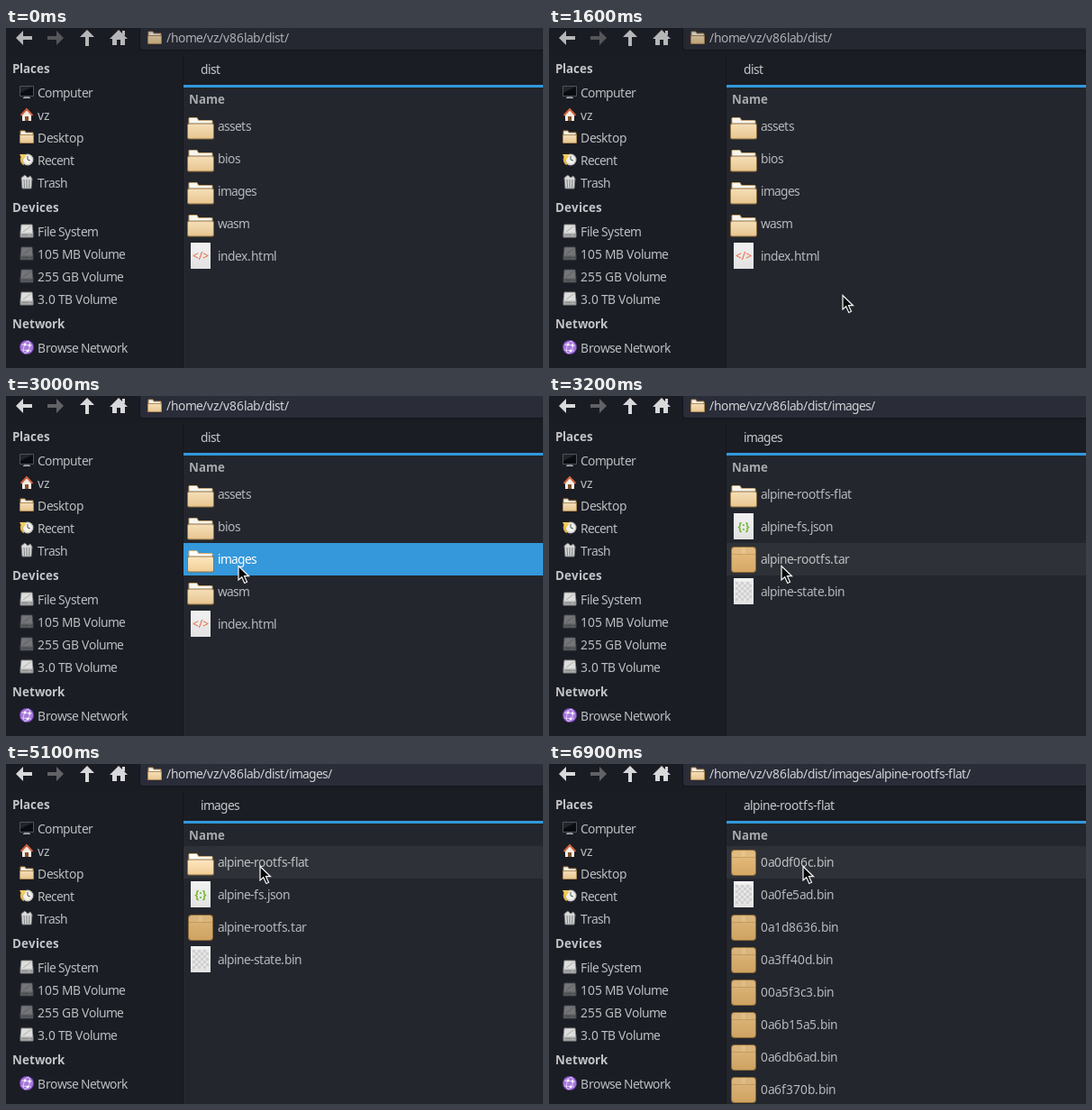
An HTML page with a canvas that plays this animation: 596 by 377 pixels, repeating every 8000 ms.

```html
<!DOCTYPE html>
<html lang="en">
<head>
<meta charset="utf-8">
<title>File manager</title>
<style>
html, body { margin: 0; width: 100%; height: 100%; overflow: hidden; background: #1a1d24; }
canvas { display: block; width: 596px; height: 377px; }
</style>
</head>
<body>
<canvas id="stage" width="596" height="377"></canvas>
<script>
const ctx = document.getElementById('stage').getContext('2d');
const LOOP = 8000, STEP = 100, ROW = 36, LIST_TOP = 91;
const SANS = '"Noto Sans", sans-serif';
const BLUE = '#3498db';

const HOME = '/home/vz/v86lab/dist/';
const views = {
  dist: {
    title: 'dist', path: HOME,
    items: [['folder', 'assets'], ['folder', 'bios'], ['folder', 'images'], ['folder', 'wasm'], ['html', 'index.html']]
  },
  images: {
    title: 'images', path: HOME + 'images/',
    items: [['folder', 'alpine-rootfs-flat'], ['json', 'alpine-fs.json'], ['pack', 'alpine-rootfs.tar'], ['bin', 'alpine-state.bin']]
  },
  flat: {
    title: 'alpine-rootfs-flat', path: HOME + 'images/alpine-rootfs-flat/',
    items: ['0a0df06c', '0a0fe5ad', '0a1d8636', '0a3ff40d', '00a5f3c3', '0a6b15a5', '0a6db6ad', '0a6f370b']
      .map((name, i) => [i === 1 ? 'bin' : 'pack', name + '.bin'])
  }
};

const sidebar = [
  ['Places', 45, [['computer', 'Computer'], ['house', 'vz'], ['smallFolder', 'Desktop'], ['recent', 'Recent'], ['trash', 'Trash']]],
  ['Devices', 199, [['drive', 'File System'], ['darkDrive', '105 MB Volume'], ['darkDrive', '255 GB Volume'], ['drive', '3.0 TB Volume']]],
  ['Network', 328, [['globe', 'Browse Network']]]
];

function rect(x, y, w, h, color) {
  ctx.fillStyle = color;
  ctx.fillRect(x, y, w, h);
}

function round(x, y, w, h, r, color) {
  ctx.beginPath();
  ctx.roundRect(x, y, w, h, r);
  ctx.fillStyle = color;
  ctx.fill();
}

function circle(x, y, r, color) {
  ctx.beginPath();
  ctx.arc(x, y, r, 0, Math.PI * 2);
  ctx.fillStyle = color;
  ctx.fill();
}

function poly(points, fill, stroke, width = 1) {
  ctx.beginPath();
  for (let i = 0; i < points.length; i += 2) ctx.lineTo(points[i], points[i + 1]);
  ctx.closePath();
  if (fill) { ctx.fillStyle = fill; ctx.fill(); }
  if (stroke) { ctx.strokeStyle = stroke; ctx.lineWidth = width; ctx.stroke(); }
}

function line(points, color, width = 1) {
  ctx.beginPath();
  for (let i = 0; i < points.length; i += 2) ctx.lineTo(points[i], points[i + 1]);
  ctx.strokeStyle = color;
  ctx.lineWidth = width;
  ctx.stroke();
}

function shade(y0, y1, top, bottom) {
  const g = ctx.createLinearGradient(0, y0, 0, y1);
  g.addColorStop(0, top);
  g.addColorStop(1, bottom);
  return g;
}

// Hinted desktop text: whole-pixel advances, regular glyphs grown to the pixel grid.
function text(str, x, midY, color, bold) {
  const metrics = bold ? `bold 13.333px ${SANS}` : `13.3px ${SANS}`;
  const face = bold ? metrics : `13.8px ${SANS}`;
  ctx.fillStyle = color;
  for (const ch of str) {
    ctx.font = face;
    ctx.fillText(ch, x, midY + 5);
    ctx.font = metrics;
    x += Math.round(ctx.measureText(ch).width);
  }
}

function page(mark, color, weight) {
  rect(-11, -15, 22, 29, shade(-15, 14, '#f2f2f2', '#e2e2e2'));
  if (!mark) return;
  ctx.font = `${weight} 12px ${SANS}`;
  ctx.fillStyle = color;
  ctx.textAlign = 'center';
  ctx.fillText(mark, 0, 4);
  ctx.textAlign = 'left';
}

function disk(top, front, edge) {
  poly([-6, -7, 6, -7, 7, 3, 7, 7, -7, 7, -7, 3], front, edge);
  poly([-5.5, -6.5, 5.5, -6.5, 6.5, 2.5, -6.5, 2.5], top);
  line([-4, 1, 4, -5], front);
  rect(-5, 4, 7, 1, edge);
  rect(4, 4, 2, 1, edge);
}

// Icons are drawn around the origin.
const icons = {
  folder() {
    poly([-13.5, -9, -12.5, -10, -4, -10, -2, -7, 12.5, -7, 13.5, -6, 13.5, 3, -13.5, 3], '#c9a56c');
    poly([-12.5, -9, -4.5, -9, -2.5, -6, 12.5, -6, 12.5, 2, -12.5, 2], '#f7f6f2');
    round(-15, -3.5, 30, 18, 2, '#8f7043');
    round(-14, -2.5, 28, 16, 1.5, shade(-3, 14, '#f5dfb9', '#e7c58f'));
  },
  html() { page('</>', '#ea6339', 'normal'); },
  json() { page('{:}', '#75b832', 'bold'); },
  bin() {
    page();
    for (let y = 0; y < 7; y++)
      for (let x = 0; x < 6; x++)
        rect(-9 + x * 3, -11 + y * 3, 3, 3, (x + y) % 2 ? '#e6e6e6' : '#d0d0d0');
  },
  pack() {
    round(-14, -14, 28, 29, 4, '#8d6938');
    round(-13, -13, 26, 27, 3, shade(-8, 13, '#dbb478', '#cfa362'));
    round(-12, -13, 24, 7, [3, 3, 0, 0], '#d9b47c');
    rect(-13, -6, 26, 1, '#c49a5d');
    rect(-2, -13, 4, 7, '#dfbd88');
  },
  smallFolder() {
    poly([-7, -7, -2, -7, -1, -5, 7, -5, 7, 2, -7, 2], '#f4f3ef', '#b18a50');
    round(-8, -3, 16, 10, 1, '#b08c55');
    round(-7, -2, 14, 8, 1, shade(-3, 7, '#f5dfb9', '#e8c68f'));
  },
  computer() {
    round(-8, -7, 16, 12, 1, '#50545a');
    rect(-7, -6, 14, 10, '#090c11');
    poly([-7, -6, 7, -6, -7, 1], '#20242b');
    rect(-3, 5, 6, 1, '#777a7e');
    rect(-4, 6, 8, 1, '#b5b7b8');
  },
  house() {
    poly([-5, -1, 0, -6, 5, -1, 5, 7, -5, 7], '#f0ece4');
    line([-6.5, 1, 0, -6, 6.5, 1], '#d0603c', 2);
    rect(-2, 2, 4, 5, '#81502f');
  },
  recent() {
    circle(1, 0, 6.5, '#c9c9c5');
    circle(1, 0, 5, '#f3f2ec');
    line([1, -4, 1, 0, 4, 1], '#555');
    ctx.beginPath();
    ctx.arc(0, 0, 6, 2.1, 4.2);
    ctx.strokeStyle = '#dfb445';
    ctx.lineWidth = 2.5;
    ctx.stroke();
    poly([-8, -6, 0, -6, -4, 1], '#efcd62');
  },
  trash() {
    poly([-6, -5, -2, -8, 1, -5, 4, -7, 6, -4, 5, 7, -5, 7], '#d9dad9', '#77797b');
    for (let x = -3; x <= 3; x += 3) line([x, -3, x * .85, 6], '#777a7c');
  },
  drive() { disk('#dededc', '#a9abab', '#888a8b'); },
  darkDrive() { disk('#737578', '#5b5d60', '#45474b'); },
  globe() {
    circle(0, 0, 8, '#7446ad');
    circle(0, 0, 7, '#a878de');
    ctx.strokeStyle = '#dfc9f5';
    ctx.lineWidth = 1;
    ctx.beginPath();
    ctx.ellipse(0, 0, 3.2, 7, .3, 0, Math.PI * 2);
    ctx.stroke();
    line([-6, -3, 6, -2], '#dfc9f5');
    line([-6, 3, 5, 4], '#dfc9f5');
    for (const [x, y] of [[-2, -3], [3, -2], [1, 4]]) circle(x, y, 1.4, '#fff');
  }
};

function icon(name, x, y, brightness = 1) {
  ctx.save();
  ctx.translate(x, y);
  if (brightness !== 1) ctx.filter = `brightness(${brightness})`;
  icons[name]();
  ctx.restore();
}

function navArrow(x, y, angle, color) {
  ctx.save();
  ctx.translate(x, y);
  ctx.rotate(angle);
  poly([-9, 0, -1, -8, -1, -2, 9, -2, 9, 2, -1, 2, -1, 8], color);
  ctx.restore();
}

function toolbar(path, active) {
  const color = active ? '#d8d9da' : '#b5b6b8';
  rect(0, 0, 596, 29, '#1a1c23');
  navArrow(20, 11, 0, color);
  navArrow(55, 11, Math.PI, active ? '#606266' : '#54565a');
  navArrow(90, 11, Math.PI / 2, color);
  poly([125, 2, 135, 12, 132, 12, 132, 19, 127, 19, 127, 13, 123, 13, 123, 19, 118, 19, 118, 12, 115, 12], color);
  rect(129, 3, 3, 5, color);
  round(148, -6, 460, 31, 3, '#13151a');
  round(149, -6, 460, 30, 3, active ? '#2a2c38' : '#252731');
  icon('smallFolder', 165, 11, active ? 1 : .82);
  text(path, 178, 11, active ? '#d0d2d5' : '#adafb2');
}

function drawSidebar() {
  rect(0, 29, 197, 348, '#1a1d24');
  rect(196, 29, 1, 348, '#15171c');
  for (const [head, y, rows] of sidebar) {
    text(head, 7, y, '#c2c4c7', true);
    rows.forEach(([name, label], i) => {
      const rowY = y + 27 + i * 25;
      icon(name, 23, rowY - 1);
      text(label, 35, rowY, '#bcbec1');
    });
  }
}

function drawList(view, hover, selected) {
  rect(197, 29, 399, 34, '#1a1d24');
  text(view.title, 216, 46, '#c6c8ca');
  rect(197, 63, 399, 3, BLUE);
  rect(197, 66, 399, 311, '#23262d');
  text('Name', 203, 79, '#a7a9ad', true);
  view.items.forEach(([kind, label], i) => {
    const top = LIST_TOP + i * ROW, mid = top + 18;
    const picked = i === selected, lit = i === hover;
    if (picked || lit) rect(197, top, 399, ROW, picked ? BLUE : '#2e3137');
    icon(kind, 216, mid, lit || picked ? 1.04 : 1);
    text(label, 235, mid, picked ? '#ffffff' : lit ? '#bec0c2' : '#b6b8bb');
  });
}

function pointer(x, y) {
  ctx.save();
  ctx.translate(x + 1, y + 1);
  poly([0, .5, 0, 16, 3.7, 12.7, 6.8, 19.5, 9.5, 18.3, 6.5, 11.7, 11.5, 11.7], '#07080a', '#f5f5f5', 1.2);
  ctx.restore();
}

function edgeCursor(x, y) {
  ctx.save();
  ctx.translate(x + .5, y + .5);
  poly([-7, 13, 7, 13, 7, 17, -7, 17], '#07080a', '#f5f5f5', 1.2);
  poly([-2.5, 0, 2.5, 0, 2.5, 7, 7, 7, 0, 14, -7, 7, -2.5, 7], '#07080a', '#f5f5f5', 1.2);
  ctx.restore();
}

function glide(t, start, end, from, to) {
  const p = Math.min(1, Math.max(0, (t - start) / (end - start)));
  const e = p * p * (3 - 2 * p);
  return from.map((v, i) => Math.round(v + (to[i] - v) * e));
}

function draw(t) {
  const view = t < 3100 ? views.dist : t < 6400 ? views.images : views.flat;
  const [x, y] = t < 4400
    ? glide(t, 1200, 2100, [374, 372], [257, 187])
    : glide(t, 4400, 5100, [257, 187], [281, 112]);
  const settling = (t >= 3100 && t < 3200) || (t >= 6400 && t < 6900);
  const hover = t < 1300 || settling ? -1 : Math.floor((y - LIST_TOP) / ROW);
  const selected = t >= 3000 && t < 3100 ? 2 : t >= 6100 && t < 6400 ? 0 : -1;

  toolbar(view.path, t >= 3000);
  drawSidebar();
  drawList(view, hover, selected);
  if (t >= 1300) pointer(x, y);
  else if (t >= 1200) edgeCursor(374, 362);
}

const start = performance.now();
function tick() {
  const t = (performance.now() - start) % LOOP;
  draw(Math.floor(t / STEP) * STEP);
  requestAnimationFrame(tick);
}
tick();
</script>
</body>
</html>
```
